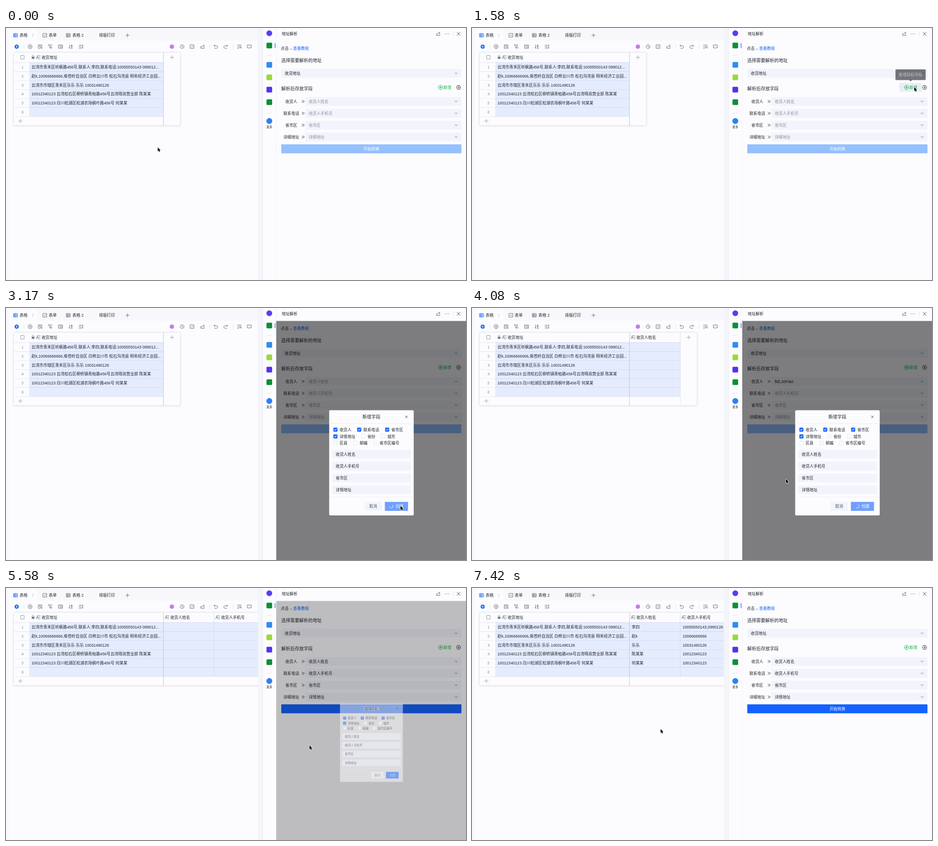
Write an HTML page with a canvas that moves like this. It is 1011 px wide and 554 px high and loops after 8000 ms.

```html
<!DOCTYPE html>
<html lang="zh-CN">
<head>
<meta charset="utf-8">
<title>地址解析</title>
<style>
html, body { margin: 0; width: 100%; height: 100%; overflow: hidden; background: #fcfcff; }
canvas { display: block; width: 1011px; height: 554px; }
</style>
</head>
<body>
<canvas id="stage"></canvas>
<script>
const W = 1011, H = 554, LOOP = 8000, STEP = 1000 / 12;
const canvas = document.getElementById('stage');
const g = canvas.getContext('2d');
const dpr = window.devicePixelRatio || 1;
canvas.width = W * dpr;
canvas.height = H * dpr;

const INK = '#1f2329', ICON = '#51565f', FAINT = '#8d929b', BLUE = '#1463ff', GREEN = '#10b144';
const PAPER = '#fcfcff', FIELD = '#f2f4fc', LINE = '#e3e4ea';
const FONT = '"Liberation Sans", "Noto Sans CJK SC", "Noto Sans CJK", sans-serif';
const SIZE = 8.67;

const clamp = (v, a, b) => Math.max(a, Math.min(b, v));

function text(s, x, y, { color = INK, size = SIZE, weight = 400, align = 'left' } = {}) {
  g.font = `${weight} ${size}px ${FONT}`;
  g.fillStyle = color;
  g.textAlign = align;
  g.fillText(s, x, y + size * 0.37);
}

function box(x, y, w, h, fill, r = 0, stroke) {
  g.beginPath();
  g.roundRect(x, y, w, h, r);
  if (fill) { g.fillStyle = fill; g.fill(); }
  if (stroke) { g.strokeStyle = stroke; g.lineWidth = 0.8; g.stroke(); }
}

function dot(x, y, r, fill) {
  g.beginPath();
  g.arc(x, y, r, 0, 7);
  g.fillStyle = fill;
  g.fill();
}

function icon(d, x, y, color = ICON, width = 0.85) {
  g.save();
  g.translate(x, y);
  g.strokeStyle = color;
  g.lineWidth = width;
  g.lineJoin = g.lineCap = 'round';
  g.stroke(new Path2D(d));
  g.restore();
}

const ring = r => `M${r} 0A${r} ${r} 0 1 1 ${-r} 0A${r} ${r} 0 1 1 ${r} 0`;
const PLUS = 'M-4 0H4M0-4V4';
const CROSS = 'M-3.3-3.3L3.3 3.3M3.3-3.3L-3.3 3.3';
const GRID = 'M-4-3.8H4V3.8H-4ZM-4-1.2H4M-4 1.4H4M-1.2-3.8V3.8';
const TICKBOX = 'M-4-4H4V4H-4ZM-2 0L-.4 1.6 2.2-1.5';
const GEAR = 'M-2.3-4.2H2.3L4.6 0 2.3 4.2H-2.3L-4.6 0Z' + ring(1.5);
const SHARE = 'M-3.8-1V3.8H3.4V1M-2 1.2C-1.5-1 0-2.2 3.6-2.2M1.6-4.2L3.8-2.2 1.6-.2';
const UNDO = 'M-2-4L-4-2-2 0M-4-2H1.5A2.7 2.7 0 0 1 1.5 3.6H-2.5';
const REDO = 'M2-4L4-2 2 0M4-2H-1.5A2.7 2.7 0 0 0-1.5 3.6H2.5';
const CHEVRON = 'M-2.5-1.2L0 1.3 2.5-1.2';
const GUILLEMET = 'M-2.5-2.6L0 0-2.5 2.6M.3-2.6L2.8 0 .3 2.6';
const TEXT_TYPE = 'M-4.5 3.5L-2-3.8 .4 3.5M-3.6 1H-.6M-.6-3.6H4.4M1.2-.1H4.4M1.8 3.4H4.4';

const TOOLS = [
  [53, GEAR],
  [75, 'M4-.8V-4H-4V4H0M-2-1.7H2M-2 .5H0' + 'M4 2A1.5 1.5 0 1 1 1 2A1.5 1.5 0 1 1 4 2M3.6 3.2L4.6 4.3'],
  [97, 'M-4-4H3.4L.8-.5V3.5L-1.4 2.2V-.5ZM2.2 1H4M2.2 3.2H4'],
  [120, 'M-4.3-3.6H4.3V3.6H-4.3ZM-2.5-1.4H-2M-.6-1.4H2.6M-2.5 1.2H-2M-.6 1.2H2.6'],
  [142, 'M-2.5-4V4L-4.2 2.2M.6-.6L2.3-4.2 4-.6M1-1.7H3.6M.8 1H3.8L.8 4H3.9'],
  [165, 'M-4.5-3.2H.6M-4.5 0H.6M-4.5 3.2H.6M3.2-3.6V3.6M1.9-2.4L3.2-3.7 4.5-2.4M1.9 2.4L3.2 3.7 4.5 2.4'],
  [387, ring(4.2) + 'M0-2.3V.3L2 1.3'],
  [409, TICKBOX],
  [432, SHARE],
  [461, UNDO],
  [483, REDO],
  [513, 'M-4.4-3.4H4.2M-4.4 0H-1M-4.4 3.4H-1M3.8 1A1.7 1.7 0 1 1 .4 1A1.7 1.7 0 1 1 3.8 1M3.4 2.4L4.8 3.8'],
  [535, 'M-4.2-3.6H4.2V2.6H1.2L0 4 -1.2 2.6H-4.2ZM-1.4-.4H-1.3M1.3-.4H1.4']
];

const ROWS = [
  ['云湾市青禾区听枫路456号,联系人:李四,联系电话:10055550143 099012...', '李四', '10055550143,0990126'],
  ['赵k,10066666666,南苍岭自治区 白桦云川市 松石沟湾县 明禾经济工业园...', '赵k', '10066666666'],
  ['云湾市市辖区青禾区乐乐 乐乐 10031490126', '乐乐', '10031490126'],
  ['10012340123 云湾松石区柳桥镇青柏路456号云湾晴岚营业部 陈某某', '陈某某', '10012340123'],
  ['10012340123 白川松湖区松湖农场枫叶路456号 何某某', '何某某', '10012340123'],
  ['', '', '']
];

// Pointer stops: step, x, y
const PATH = [
  [1, 333.5, 262.5], [3, 445, 286], [7, 445, 286], [15, 970, 132], [16, 972, 130],
  [20, 972, 130], [26, 857.5, 458], [28, 864, 447], [31, 867, 435], [39, 867, 435],
  [47, 694, 375], [49, 690, 376], [57, 684, 362], [67, 667, 346], [69, 667, 341],
  [75, 667, 341], [76, 677, 321.5], [80, 770, 268], [81, 778, 266], [82, 778, 266],
  [88, 420, 309], [89, 414.5, 310]
];

function pointerAt(n) {
  const i = PATH.findIndex(p => p[0] >= n);
  if (i < 0) return PATH[PATH.length - 1].slice(1);
  if (i === 0) return PATH[0].slice(1);
  const [n0, x0, y0] = PATH[i - 1], [n1, x1, y1] = PATH[i];
  const k = (n - n0) / (n1 - n0), e = k * k * (3 - 2 * k);
  return [x0 + (x1 - x0) * e, y0 + (y1 - y0) * e];
}

function drawPointer(x, y) {
  g.save();
  g.translate(x, y);
  const p = new Path2D('M0 0V8.8L2 7 3.5 10.3 5 9.6 3.6 6.4H6.3Z');
  g.lineJoin = 'round';
  g.lineWidth = 1.3;
  g.strokeStyle = '#fff';
  g.stroke(p);
  g.fillStyle = '#000';
  g.fill(p);
  g.restore();
}

function drawTabs() {
  box(0, 0, W, H, '#f8f8fc');
  box(6, 28, 548, 526, PAPER);
  box(6, 4, 64, 25, PAPER, [4, 4, 0, 0]);
  icon(GRID, 21, 16, BLUE, 1);
  text('表格', 30, 16);
  for (const d of [-3, 0, 3]) dot(59, 16 + d, 0.65, FAINT);
  icon(TICKBOX, 85.5, 16);
  text('表单', 94, 16);
  icon(GRID, 137, 16);
  text('表格 2', 146, 16);
  text('排版打印', 204.5, 16);
  icon(PLUS, 267, 16);

  dot(23.5, 41, 4.6, BLUE);
  icon('M-2.2 0H2.2M0-2.2V2.2', 23.5, 41, '#fff', 1);
  for (const x of [39, 447, 499]) box(x, 36, 0.8, 10, '#dcdde3');
  dot(364.5, 41, 4.8, '#c77bea');
  for (const [x, d] of TOOLS) icon(d, x, 41);
}

function drawTable(n) {
  const cols = n >= 52 ? 3 : n >= 45 ? 2 : 1;
  const edge = 346 + (cols - 1) * 111.5;
  const right = edge + 37.3, top = 76, rowH = 19.77;
  g.save();
  g.beginPath();
  g.rect(6, 28, 548, 526);
  g.clip();
  g.shadowColor = 'rgba(30,40,70,.12)';
  g.shadowBlur = 4 * dpr;
  g.shadowOffsetY = dpr;
  box(16.5, 53.5, right - 16.5, 161, PAPER, 3);
  g.shadowColor = 'transparent';
  box(16.5, 53.5, right - 16.5, 161, PAPER, 3, '#dcdde4');

  box(51, top, edge - 51, rowH * 6, '#e5ecfe');
  for (let i = 0; i <= 6; i++) {
    const y = top + i * rowH - 0.4;
    box(17, y, 34, 0.8, LINE);
    box(51, y, edge - 51, 0.8, i && i < 6 ? '#c9d8f7' : '#d3dcf0');
  }
  for (let c = 1; c < cols; c++) box(345.6 + c * 111.5, 54, 0.8, 140.6, '#cbd5ec');
  if (cols === 1) box(346, 194.6, 0.8, 20, LINE);
  else box(edge, 54, 0.8, 160, LINE);
  box(345.6, 54, 0.9, 160.5, '#b9bfcc');

  box(32.2, 60.4, 7.8, 7.8, null, 0.6, '#747982');
  box(56.6, 63.2, 5.8, 4.6, '#747982', 0.6);
  icon('M-1.7 0V-1.5A1.7 1.7 0 0 1 1.7-1.5V0', 59.5, 63.2, '#747982');
  ['收货地址', '收货人姓名', '收货人手机号'].slice(0, cols).forEach((name, c) => {
    const x = c ? 354 + (c - 1) * 111.5 : 71;
    icon(TEXT_TYPE, x, 64.5, ICON, 0.75);
    text(name, x + 7.2, 64.5);
  });
  icon(PLUS, edge + 18.7, 64.5, FAINT);
  icon(PLUS, 31.5, 204.5, FAINT);

  ROWS.forEach((row, i) => {
    const y = top + (i + 0.5) * rowH;
    text(i + 1, 36.3, y, { color: FAINT, align: 'center' });
    text(row[0], 56, y);
    if (n >= 86) {
      text(row[1], 351, y);
      text(row[2], 462.7, y);
    }
  });
  g.restore();
}

function drawSidebar() {
  box(554, 0, 10, H, '#f4f5fa');
  box(564, 0, W - 564, H, PAPER);
  box(563.6, 0, 0.8, H, '#e9eaf1');
  box(593.6, 0, 0.8, H, '#eeeef4');
  dot(578.7, 11.5, 6.3, '#5a3df0');
  for (const [y, color] of [[38.5, '#0c8f35'], [81, '#2f8df3'], [108.5, '#98dc35'], [135.5, '#5233ee'], [163, '#0c8f35']])
    box(572.5, y - 6.2, 12.4, 12.4, color, 2);
  box(590.8, 33.5, 1.3, 10.5, BLUE);
  for (const y of [59.5, 186.5]) box(573, y, 11.5, 0.8, '#dddee5');
  dot(578.7, 204.5, 6.5, '#2f80f5');
  text('更多', 578.7, 218, { size: 6.3, align: 'center' });
}

function select(x, y, value, color) {
  box(x, y - 9.7, 1001 - x, 19.3, FIELD, 1);
  text(value, x + 7.8, y, { color });
  icon(CHEVRON, 989.3, y, ICON, 0.9);
}

function drawPanel(n) {
  text('地址解析', 606, 12.5, { weight: 500 });
  icon(SHARE, 950, 12.7);
  for (const d of [-3.6, 0, 3.6]) dot(969 + d, 12.7, 0.75, ICON);
  box(982.6, 8, 0.8, 9, '#dcdde3');
  icon(CROSS, 994.7, 12.7, INK);

  text('点击→', 604, 45);
  text('查看教程', 631, 45, { color: BLUE });
  text('选择需要解析的地址', 605, 71.3, { size: 9.9, weight: 500 });
  select(605, 99.6, '收货地址', INK);
  text('解析后存放字段', 605, 133, { size: 9.9, weight: 500 });
  if (n >= 14 && n <= 20) box(939, 121, 50, 19.3, '#ececf5', 1);
  icon(ring(4.6) + 'M-2.4 0H2.4M0-2.4V2.4', 955, 130.6, GREEN, 1);
  text('新增', 961.3, 130.6, { color: GREEN });
  icon(GEAR, 994.8, 130.6, INK, 0.95);

  [
    ['收货人', '收货人姓名', '收货人姓名', 48],
    ['联系电话', '收货人手机号', '收货人手机号', 54],
    ['省市区', '省市区', '省市区', 56],
    ['详细地址', '详细地址', '详情地址', 57]
  ].forEach(([label, hint, value, since], i) => {
    const y = 161.5 + i * 26.05;
    text(label, 627, y, { align: 'center' });
    icon(GUILLEMET, 653, y, INK, 0.9);
    const set = n >= since;
    const raw = i === 0 && set && n < 52;
    select(657.6, y, raw ? 'fldL30F9et' : set ? value : hint, set ? INK : FAINT);
  });

  const hover = n >= 79 && n <= 84;
  box(605, 255.8, 396, 19.6, n < 57 ? '#94c0ff' : hover ? '#4683ff' : BLUE, 1);
  text('开始转换', 803, 265.7, { color: '#fff', align: 'center' });

  if (n >= 15 && n <= 19) {
    g.globalAlpha = n === 15 || n === 19 ? 0.6 : 1;
    box(930.7, 91, 66.4, 23.4, '#1d1f24', 2);
    g.beginPath();
    g.moveTo(960.8, 114);
    g.lineTo(967.2, 114);
    g.lineTo(964, 117.4);
    g.fill();
    text('新增目标字段', 964, 102.7, { color: '#fff', align: 'center' });
    g.globalAlpha = 1;
  }
}

function checkbox(x, y, label, on) {
  box(x - 4.1, y - 4.1, 8.2, 8.2, on ? BLUE : PAPER, 1, on ? BLUE : '#dfe1e8');
  if (on) icon('M-2.1 0L-.6 1.6 2.2-1.5', x, y, '#fff', 1.1);
  text(label, x + 9.2, y);
}

function drawModal(n) {
  const k = n < 40 ? clamp(23 - n, 0, 4) : clamp(n - 65, 0, 4);
  const alpha = 1 - k / 4, scale = 1 - 0.128 * k;
  if (!alpha) return;
  box(594, 28.5, W - 594, H - 28.5, `rgba(0,0,0,${0.5 * alpha})`);
  g.save();
  g.globalAlpha = alpha;
  g.translate(803, 340.3);
  g.scale(scale, scale);
  g.translate(-803, -340.3);

  box(710.3, 224.7, 185.8, 231.2, PAPER, 2.5);
  text('新增字段', 803, 239.5, { size: 9.9, weight: 500, align: 'center' });
  icon('M-2.2-2.2L2.2 2.2M2.2-2.2L-2.2 2.2', 880, 239.3, INK);
  box(710.3, 253.6, 185.8, 0.8, '#ebecf2');
  box(710.3, 415.3, 185.8, 0.8, '#ebecf2');

  checkbox(724, 267.4, '收货人', true);
  checkbox(776.3, 267.4, '联系电话', true);
  checkbox(837.7, 267.4, '省市区', true);
  checkbox(724, 282.3, '详情地址', true);
  checkbox(785.2, 282.3, '省份');
  checkbox(829, 282.3, '城市');
  checkbox(724, 297.2, '区县');
  checkbox(768, 297.2, '邮编');
  checkbox(811.8, 297.2, '省市区编号');

  ['收货人姓名', '收货人手机号', '省市区', '详情地址'].forEach((s, i) => {
    const y = 321.5 + i * 26.05;
    box(716.7, y - 9.7, 173.3, 19.3, FIELD, 1);
    text(s, 724.8, y);
  });

  const busy = n >= 38 && n < 64;
  const shift = busy ? 13.6 : 0;
  box(802 - shift, 426.2, 37.4, 19.7, FIELD, 1);
  text('取消', 820.6 - shift, 436, { color: '#4e5969', align: 'center' });
  const color = busy ? '#709fff' : n >= 36 && n < 38 ? '#0f47d4' : n >= 30 && n < 36 ? '#4683ff' : BLUE;
  box(846.3 - shift, 426.2, 37.3 + shift, 19.7, color, 1);
  text('创建', busy ? 864.8 : 865, 436, { color: '#fff', align: 'center' });
  if (busy) {
    const a = 2.6 + (n - 49) * Math.PI / 6;
    g.beginPath();
    g.arc(847, 436, 3.6, a - 4, a);
    g.strokeStyle = '#fff';
    g.lineWidth = 0.9;
    g.stroke();
  }
  g.restore();
}

function frame() {
  const n = Math.floor(((performance.now() + 5) % LOOP) / STEP);
  g.setTransform(dpr, 0, 0, dpr, 0, 0);
  g.globalAlpha = 1;
  drawTabs();
  drawTable(n);
  drawSidebar();
  drawPanel(n);
  drawModal(n);
  drawPointer(...pointerAt(n));
  requestAnimationFrame(frame);
}
frame();
</script>
</body>
</html>
```
